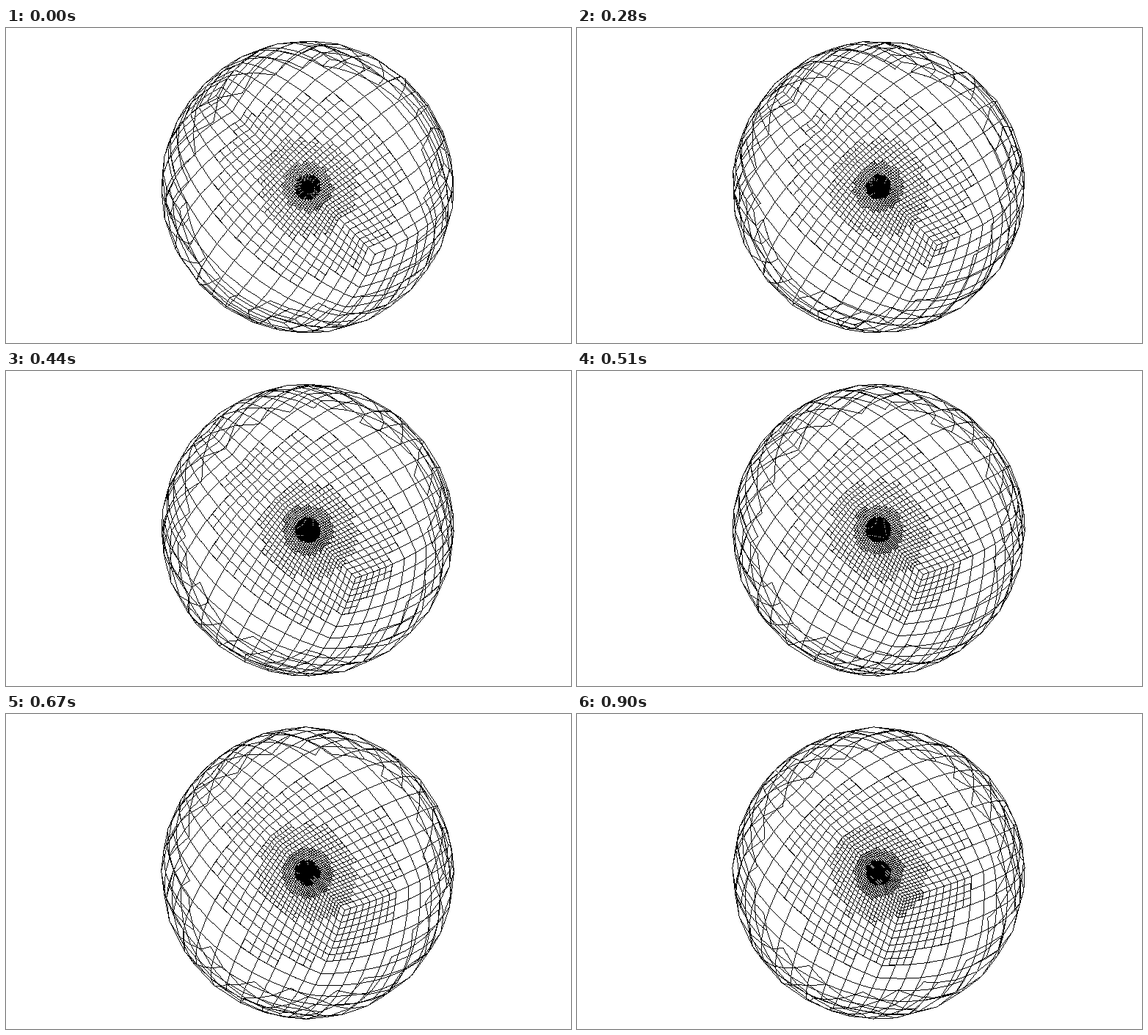
Write an HTML page with a canvas that moves like this. It is 770x430 px and loops after 970 ms.

```html
<!DOCTYPE html>
<html lang="en">
<head>
<meta charset="utf-8">
<title>Quadtree sphere</title>
<style>
  html, body { margin: 0; width: 100%; height: 100%; overflow: hidden; background: #fff; }
  canvas { display: block; width: 770px; height: 430px; }
</style>
</head>
<body>
<canvas id="stage" width="770" height="430"></canvas>
<script>
const W = 770, H = 430, CX = 411, CY = 217, RADIUS = 199.5;
const LOOP = 970;
const STEPS = [70, 130, 210, 290, 360, 440, 510, 590, 670, 750, 820, 900];
const RAD = Math.PI / 180;

const EYE = 2.52;                                  // camera distance in sphere radii
const FOCAL = RADIUS * Math.sqrt(EYE * EYE - 1);
const DETAIL = 3.6;                                // split while nearer than DETAIL * size
const MIN_SIZE = 1 / 256;
const BACK_LIMIT = Math.cos(99 * RAD);             // tiles further round are dropped
const EDGE_HALF = Math.atan(Math.SQRT1_2);         // half the angle of a cube edge

const ctx = document.getElementById('stage').getContext('2d');
const image = ctx.createImageData(W, H);
const pixels = new Uint32Array(image.data.buffer);
const BLACK = 0xff000000, WHITE = 0xffffffff;

let sinA, cosA;

// Point of a cube face on the unit sphere, in view space (z towards the camera).
function viewPoint(axis, sign, u, v) {
  const n = 1 / Math.sqrt(1 + u * u + v * v);
  const p = [0, 0, 0];
  p[axis] = sign * n;
  p[(axis + 1) % 3] = u * n;
  p[(axis + 2) % 3] = v * n;
  const mid = (p[0] + p[1]) * Math.SQRT1_2;
  const side = (p[0] - p[1]) * Math.SQRT1_2;
  const along = p[2] * cosA - mid * sinA;
  return {
    x: (along + side) * Math.SQRT1_2,
    y: (along - side) * Math.SQRT1_2,
    z: mid * cosA + p[2] * sinA
  };
}

function project(p) {
  const k = FOCAL / (EYE - p.z);
  return [CX + p.x * k, CY + p.y * k];
}

// One pixel wide line without smoothing.
function line([x0, y0], [x1, y1]) {
  const n = Math.max(Math.ceil(Math.abs(x1 - x0)), Math.ceil(Math.abs(y1 - y0)), 1);
  const dx = (x1 - x0) / n, dy = (y1 - y0) / n;
  for (let i = 0; i <= n; i++) {
    pixels[Math.floor(y0 + dy * i) * W + Math.floor(x0 + dx * i)] = BLACK;
  }
}

function tile(axis, sign, u, v, size) {
  const h = size / 2;
  const c = viewPoint(axis, sign, u, v);
  const dist = Math.hypot(c.x, c.y, c.z - 1);
  if (size > MIN_SIZE && dist < DETAIL * size) {
    const q = h / 2;
    for (const a of [-q, q]) {
      for (const b of [-q, q]) tile(axis, sign, u + a, v + b, h);
    }
    return;
  }
  if (c.z < BACK_LIMIT) return;
  const corners = [[-h, -h], [h, -h], [h, h], [-h, h]]
    .map(([a, b]) => project(viewPoint(axis, sign, u + a, v + b)));
  corners.forEach((p, i) => line(p, corners[(i + 1) % 4]));
}

function draw(step) {
  const angle = EDGE_HALF - (27.4 - 1.5 * step) * RAD;
  sinA = Math.sin(angle);
  cosA = Math.cos(angle);
  pixels.fill(WHITE);
  for (let axis = 0; axis < 3; axis++) {
    tile(axis, 1, 0, 0, 2);
    tile(axis, -1, 0, 0, 2);
  }
  ctx.putImageData(image, 0, 0);
}

let shown = -1;
const start = performance.now();

function tick() {
  const t = (performance.now() - start) % LOOP;
  const step = STEPS.filter(s => s <= t).length;
  if (step !== shown) {
    draw(step);
    shown = step;
  }
  requestAnimationFrame(tick);
}
tick();
</script>
</body>
</html>
```
